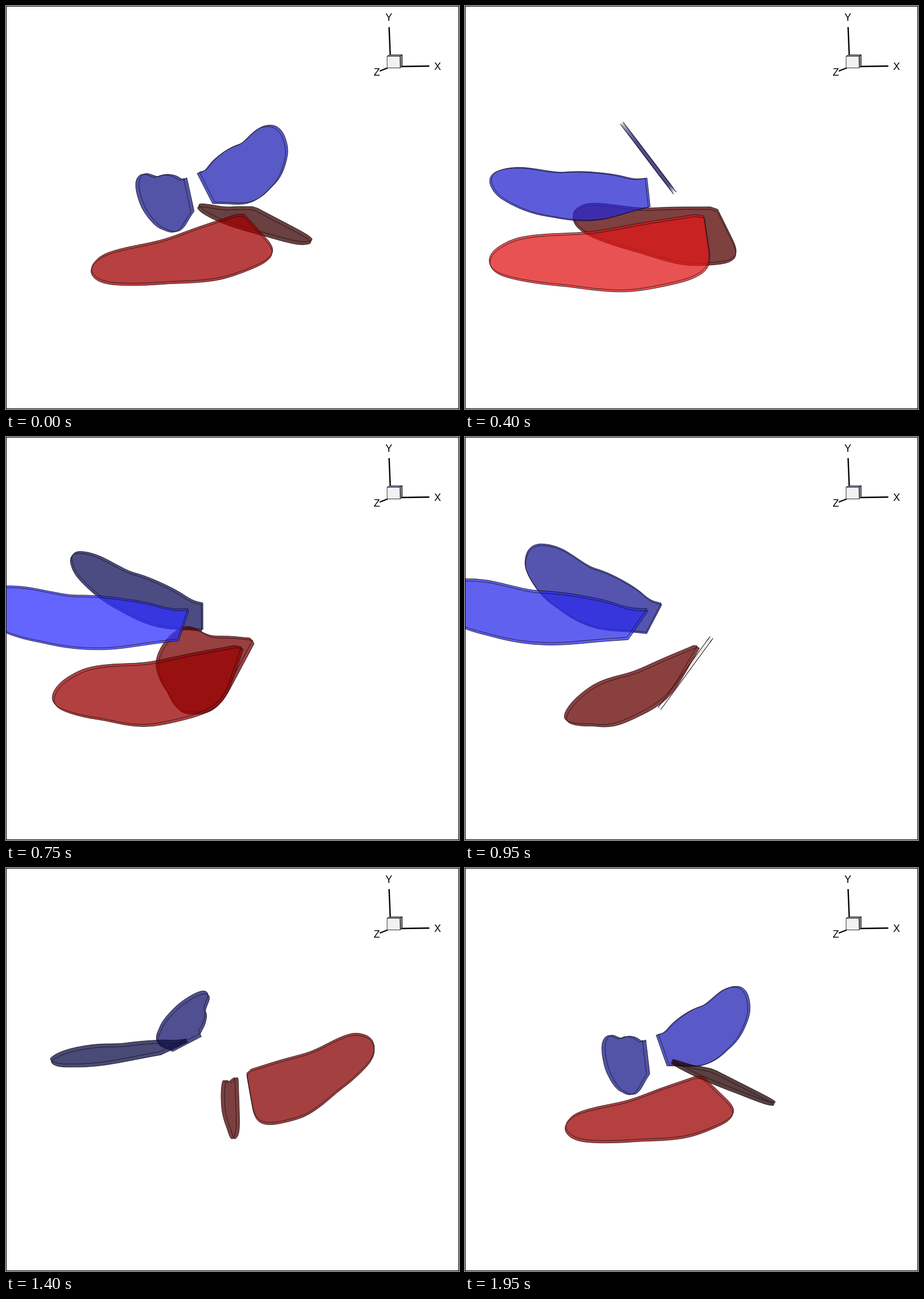
These frames come from a looping animation (794 by 706 pixels, 2 s). An HTML page with a canvas:

```html
<!DOCTYPE html>
<html lang="en">
<head>
<meta charset="utf-8">
<title>Flapping wings</title>
<style>
  html, body { margin: 0; width: 100%; height: 100%; overflow: hidden; background: #fff; }
  canvas, svg { position: absolute; left: 0; top: 0; }
  text { font: 18px "Liberation Sans", Arial, sans-serif; text-anchor: middle; fill: #000; }
</style>
</head>
<body>
<canvas id="stage" width="794" height="706"></canvas>
<svg width="794" height="706" viewBox="0 0 794 706">
  <g stroke="#000" stroke-width="2.4">
    <path d="M671.5 37 L673.5 87"/>
    <path d="M693 106 L742 105.2"/>
    <path d="M655 114 L669 108.5"/>
  </g>
  <g stroke="#000" stroke-width=".8" stroke-linejoin="round">
    <path d="M668 88 L672.5 85.5 L694.5 85.5 L690.5 88 Z" fill="#9c9cc8"/>
    <path d="M690.5 88 L694.5 85.5 L694.5 104.5 L691 108.5 Z" fill="#858585"/>
    <path d="M668 88 L690.5 88 L691 108.5 L668 108.5 Z" fill="#f1f1f3"/>
  </g>
  <text x="671" y="26">Y</text>
  <text x="756.5" y="111.5">X</text>
  <text x="650" y="121.5">Z</text>
  <rect x=".5" y=".5" width="793" height="705" fill="none" stroke="#000"/>
</svg>
<script>
const ctx = document.getElementById("stage").getContext("2d");
const LOOP = 2000, STEP = 50, ALPHA = 0.75, THICKNESS = 6;
const times = [0, 400, 600, 950, 1150, 1650, 1950];

// Outlines relative to the hinge, with the span and chord vectors of that pose.
const foreShape = {
  span: [152, -36], chord: [24, 53],
  points: [[-3, 0], [-3, 0], [10, -3], [22, -21], [45, -39], [61, -47], [72, -50],
    [84, -61], [100, -77], [117, -83], [133, -81], [145, -68], [152, -46], [152, -29],
    [145, -3], [135, 15], [124, 26], [112, 39], [95, 50], [75, 55], [45, 53], [24, 53], [24, 53]]
};
const hindShape = {
  span: [189, -22], chord: [80, 80],
  points: [[0, 0], [0, 0], [15, -7], [40, -19], [70, -30], [85, -40], [100, -55],
    [115, -65], [130, -68], [155, -63], [175, -50], [187, -34], [189, -17], [183, 8],
    [174, 26], [168, 46], [158, 63], [145, 72], [123, 80], [105, 84], [85, 81],
    [65, 69], [40, 46], [-2, 7], [-2, 7]]
};

const blue = m => [(m - 64) / 4, (m - 64) / 4, (m - 64) / ALPHA];
const red = m => {
  const low = Math.max(0, (m - 184) / 2);
  return [(m - 64) / ALPHA, low, low];
};

// Each pose: span x, y, chord x, y, brightness. Listed from back to front.
const wings = [
  { shape: foreShape, tint: blue, hinge: [340, 292], size: [250, 60], poses: [
    [152, -36, 24, 53, 200], [-42, -57, 28, 36, 150], [-164, -48, 19, 39, 110],
    [-233, -60, -22, 51, 176], [-194, -70, -47, 34, 180], [122, -30, -28, 33, 128],
    [157, -37, 16, 54, 200]] },
  { shape: hindShape, tint: red, hinge: [430, 354], size: [225, 125], poses: [
    [-36, 29, 102, 52, 106], [-210, 48, 48, 83, 128], [-215, 38, -22, 112, 152],
    [-47, 64, -74, 101, 144], [106, 25, -58, 94, 136], [189, -22, 80, 80, 176],
    [-6, 17, 106, 53, 92]] },
  { shape: hindShape, tint: red, hinge: [403, 367], size: [355, 125], poses: [
    [-214, 120, 68, 64, 184], [-332, 107, 24, 93, 232], [-340, 94, -8, 104, 208],
    [-224, 132, -46, 86, 140], [-98, 115, -64, 83, 114], [-37, 38, 80, 84, 156],
    [-187, 112, 71, 60, 180]] },
  { shape: foreShape, tint: blue, hinge: [313, 303], size: [375, 60], poses: [
    [-71, 52, 14, 57, 168], [-253, 30, 10, 49, 220], [-334, 23, 0, 50, 244],
    [-372, -7, -28, 50, 240], [-354, -2, -43, 31, 156], [-106, 66, -25, 28, 128],
    [-63, 52, 8, 58, 168]] }
];

const cross = (a, b) => a[0] * b[1] - a[1] * b[0];

// Express outlines in span and chord units.
for (const shape of [foreShape, hindShape]) {
  const det = cross(shape.span, shape.chord);
  shape.uv = shape.points.map(p => [cross(p, shape.chord) / det, cross(shape.span, p) / det]);
}

// Periodic Hermite interpolation through the poses.
function poseAt(poses, t) {
  const n = times.length;
  const timeOf = i => times[(i + n) % n] + LOOP * Math.floor(i / n);
  let i = n - 1;
  while (times[i] > t) i--;
  const h = timeOf(i + 1) - timeOf(i), s = (t - timeOf(i)) / h;
  return poses[0].map((_, k) => {
    const val = j => poses[(j + n) % n][k];
    const slope = j => {
      const before = timeOf(j) - timeOf(j - 1), after = timeOf(j + 1) - timeOf(j);
      const d0 = (val(j) - val(j - 1)) / before, d1 = (val(j + 1) - val(j)) / after;
      return (after * d0 + before * d1) / (before + after);
    };
    const a = val(i), b = val(i + 1);
    return a + (b - a) * s * s * (3 - 2 * s)
      + h * s * (1 - s) * ((1 - s) * slope(i) - s * slope(i + 1));
  });
}

// Plate normal on screen: along the most foreshortened direction.
function plateNormal([sx, sy, cx, cy], [length, width]) {
  const ax = sx / length, ay = sy / length, bx = cx / width, by = cy / width;
  const p = ax * ax + bx * bx, r = ay * ay + by * by, q = ax * ay + bx * by;
  const mid = (p + r) / 2, dev = Math.hypot((p - r) / 2, q);
  const angle = Math.atan2(2 * q, p - r) / 2 + Math.PI / 2;
  const reach = THICKNESS * Math.sqrt(1 - Math.max(0, mid - dev) / (mid + dev));
  return [reach * Math.cos(angle), reach * Math.sin(angle)];
}

function addOutline(path, points, dx, dy) {
  const n = points.length;
  const at = i => [points[i % n][0] + dx, points[i % n][1] + dy];
  const middle = (a, b) => [(a[0] + b[0]) / 2, (a[1] + b[1]) / 2];
  path.moveTo(...middle(at(0), at(1)));
  for (let i = 1; i <= n; i++) path.quadraticCurveTo(...at(i), ...middle(at(i), at(i + 1)));
  path.closePath();
}

function drawWing({ shape, tint, hinge, size, poses }, t) {
  const pose = poseAt(poses, t), [sx, sy, cx, cy, light] = pose;
  const [nx, ny] = plateNormal(pose, size);
  const points = shape.uv.map(([u, v]) =>
    [hinge[0] + u * sx + v * cx, hinge[1] + u * sy + v * cy]);
  const body = new Path2D(), edges = new Path2D();
  for (let k = -0.5; k <= 0.5; k += 0.125) addOutline(body, points, k * nx, k * ny);
  for (const k of [-0.5, 0.5]) addOutline(edges, points, k * nx, k * ny);
  ctx.fillStyle = `rgba(${tint(light).map(Math.round)}, ${ALPHA})`;
  ctx.fill(body);
  ctx.stroke(edges);
}

function draw() {
  const t = Math.floor(performance.now() / STEP) * STEP % LOOP;
  ctx.fillStyle = "#fff";
  ctx.fillRect(0, 0, 794, 706);
  ctx.lineWidth = 0.8;
  ctx.lineJoin = "round";
  ctx.strokeStyle = "#101014";
  for (const wing of wings) drawWing(wing, t);
  requestAnimationFrame(draw);
}
draw();
</script>
</body>
</html>
```
